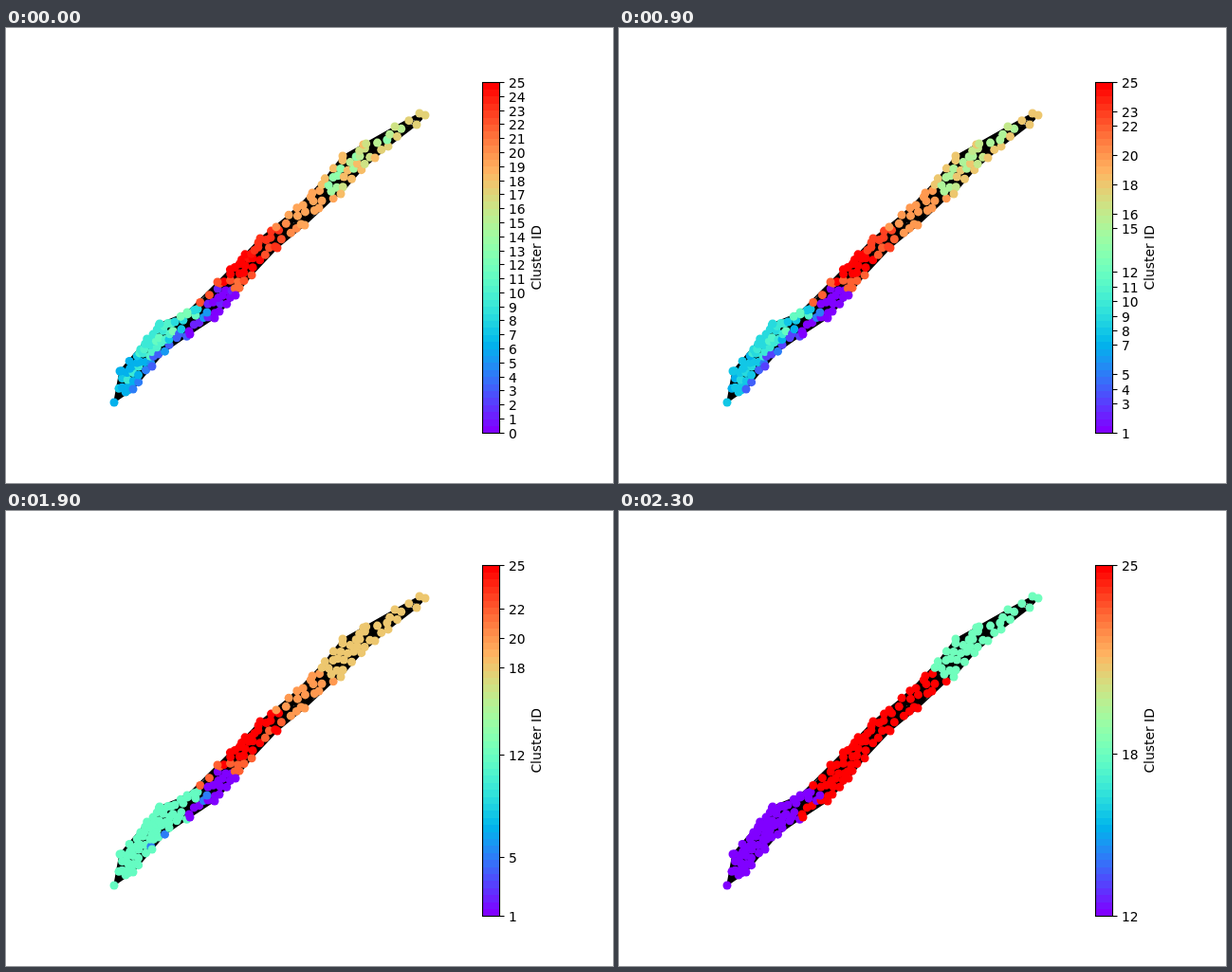
Write an HTML page that moves like this. It is 640 by 480 pixels and loops after 7.4 s.

```html
<!DOCTYPE html>
<html lang="en">
<head>
<meta charset="utf-8">
<title>Cluster merging</title>
<style>
  html, body { margin: 0; width: 100%; height: 100%; overflow: hidden; background: #fff; }
  svg { display: block; width: 640px; height: 480px; }
  text { font: 13.89px "DejaVu Sans", sans-serif; fill: #000; }
  #bands { shape-rendering: crispEdges; }
  #frame, #ticks path { fill: none; stroke: #000; stroke-width: 1.1; }
  #edges { fill: none; stroke: #000; stroke-width: 1.4; }
</style>
</head>
<body>
<svg viewBox="0 0 640 480">
  <path id="edges"/>
  <g id="nodes"></g>
  <g id="bands"></g>
  <rect id="frame" x="502.5" y="57.5" width="18" height="370"/>
  <g id="ticks"></g>
  <text transform="translate(564 242.4) rotate(-90)" text-anchor="middle">Cluster ID</text>
</svg>
<script>
const STEP = 100, LOOP = 7400, LEVELS = 50, REACH = 46, LAST = 25;
const BAR = { x: 502.5, top: 57.6, width: 18, height: 369.6 };
const byId = id => document.getElementById(id);

function make(parent, tag, attrs) {
  const el = document.createElementNS("http://www.w3.org/2000/svg", tag);
  for (const key in attrs) el.setAttribute(key, attrs[key]);
  parent.appendChild(el);
  return el;
}

let seed = 7;
function random() {
  seed = (seed * 1664525 + 1013904223) % 4294967296;
  return seed / 4294967296;
}

// Rainbow colour map reduced to 50 levels
function rainbow(v) {
  const x = Math.min(LEVELS - 1, Math.floor(v * LEVELS + 1e-9)) / (LEVELS - 1);
  const rgb = [Math.abs(2 * x - 0.5), Math.sin(Math.PI * x), Math.cos(Math.PI * x / 2)];
  return `rgb(${rgb.map(c => Math.round(255 * Math.max(0, Math.min(1, c))))})`;
}

// The two sides of the band of nodes
const upper = [[114, 395], [120, 362], [162, 312], [191, 300], [223, 268], [268, 222],
  [323, 174], [355, 135], [410, 104], [436, 90], [442, 92]];
const lower = [[114, 395], [134, 381], [154, 357], [194, 323], [220, 306], [242, 282],
  [286, 232], [315, 208], [330, 190], [353, 175], [389, 137], [433, 102], [442, 92]];

// Stretches of the band: where they end, node count, clusters from upper to lower side
const zones = [
  { end: -204, count: 23, ids: [6, 7, 6, 6, 9, 6, 6, 4] },
  { end: -132, count: 34, ids: [9, 10, 9, 11, 12, 10, 7, 3, 5, 3] },
  { end: -85, count: 13, ids: [12, 8, 11, 2, 5, 1, 0] },
  { end: -38, count: 15, ids: [22, 1, 0, 1, 0] },
  { end: -20, count: 6, ids: [25, 22, 21] },
  { end: 25, count: 15, ids: [25, 24, 25, 25, 22] },
  { end: 75, count: 11, ids: [23, 23, 20, 22, 23] },
  { end: 95, count: 4, ids: [20] },
  { end: 166, count: 12, ids: [19] },
  { end: 255, count: 25, ids: [18, 16, 13, 15, 18, 14, 16, 18] },
  { end: 312, count: 8, ids: [16, 15, 13, 17] },
  { end: 351, count: 1, ids: [17] }
];

// Distance along the band, and the point of one side at that distance
const along = ([x, y]) => x - y;
function sideAt(side, u) {
  const i = side.findIndex((p, k) => k > 0 && along(p) >= u);
  const a = side[i - 1], b = side[i];
  const f = (u - along(a)) / (along(b) - along(a));
  return [a[0] + (b[0] - a[0]) * f, a[1] + (b[1] - a[1]) * f];
}

const points = [];
function addPoint([x, y], zone, w) {
  const { ids } = zone;
  points.push({ x, y, id: ids[Math.min(ids.length - 1, Math.floor(w * ids.length))] });
}
function addRim(side, w) {
  for (const p of side) addPoint(p, zones.find(z => along(p) < z.end), w);
}

let start = -262;
for (const zone of zones) {
  for (let i = 0; i < zone.count; i++) {
    const u = start + (zone.end - start) * (i + random()) / zone.count;
    const w = (i * 0.618 + random() * 0.25) % 1;
    const a = sideAt(upper, u), b = sideAt(lower, u);
    addPoint(a.map((c, k) => c + (b[k] - c) * w), zone, w);
  }
  start = zone.end;
}
addRim(upper, 0);
addRim(lower.slice(1, -1), 1);

// Nodes within reach of each other are linked
let links = "";
points.forEach((p, i) => {
  for (const q of points.slice(i + 1)) {
    if (Math.hypot(p.x - q.x, p.y - q.y) < REACH) links += `M${p.x} ${p.y}L${q.x} ${q.y}`;
  }
});
byId("edges").setAttribute("d", links);

for (const p of points) p.dot = make(byId("nodes"), "circle", { cx: p.x, cy: p.y, r: 4.5 });

const band = BAR.height / LEVELS;
for (let i = 0; i < LEVELS; i++) {
  make(byId("bands"), "rect", {
    x: BAR.x, y: BAR.top + BAR.height - (i + 1) * band,
    width: BAR.width, height: band + 0.1, fill: rainbow((i + 0.5) / LEVELS)
  });
}

const ticks = [];
for (let id = 0; id <= LAST; id++) {
  const g = make(byId("ticks"), "g", {});
  make(g, "path", { d: "M520.5 0.5h5" });
  make(g, "text", { x: 530, y: 6 }).textContent = id;
  ticks.push(g);
}

// Each step folds the first cluster into the second
const merges = [
  [13, 14], [6, 8], [24, 25], [21, 22], [0, 1],
  [2, 3], [19, 20], [14, 15], [17, 18],
  [10, 11], [9, 11], [15, 16],
  [4, 7], [11, 12], [23, 25], [16, 18],
  [7, 8], [8, 12], [3, 12], [1, 22],
  [20, 25], [22, 25], [5, 12]
];

function show(step) {
  const owner = ticks.map((_, id) => id);
  for (const [from, to] of merges.slice(0, step)) {
    owner.forEach((o, id) => { if (o === from) owner[id] = to; });
  }
  const min = Math.min(...owner);
  const norm = id => (id - min) / (LAST - min);
  for (const p of points) p.dot.setAttribute("fill", rainbow(norm(owner[p.id])));
  ticks.forEach((g, id) => {
    const y = Math.floor(BAR.top + BAR.height * (1 - norm(id)));
    g.setAttribute("visibility", owner[id] === id ? "visible" : "hidden");
    g.setAttribute("transform", `translate(0 ${y})`);
  });
}

let shown = -1;
function tick() {
  const step = Math.min(merges.length, Math.floor(performance.now() % LOOP / STEP));
  if (step !== shown) show(shown = step);
  requestAnimationFrame(tick);
}
tick();
</script>
</body>
</html>
```
